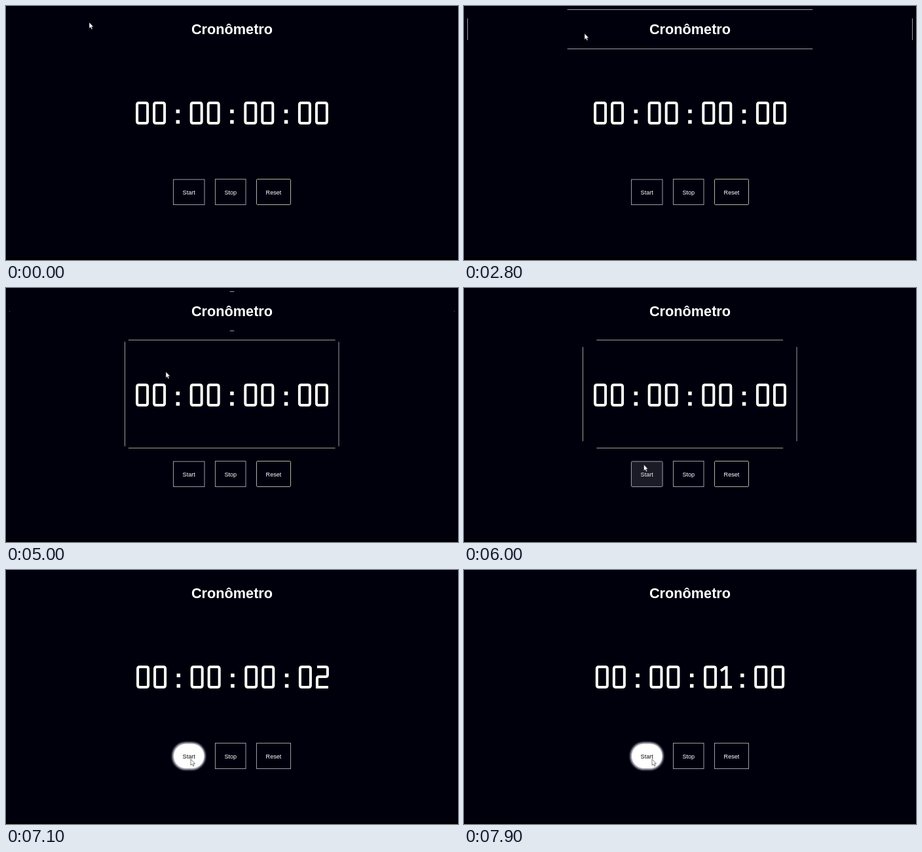
An HTML page that plays this animation: 690x388 px, repeating every 8 s.

```html
<!DOCTYPE html>
<html lang="pt">
<head>
<meta charset="utf-8">
<title>Cronômetro</title>
<style>
  html, body { margin: 0; width: 100%; height: 100%; overflow: hidden; background: #00000d; }
  svg { display: block; width: 690px; height: 388px; }
  text { font-family: "Liberation Sans", Arial, sans-serif; text-anchor: middle; fill: #fff; }
  .line { fill: none; stroke: #9c9ca2; stroke-width: 1; }
  .label { font-size: 9.1px; }
  #digits { fill: none; stroke: #fffffa; stroke-width: 4; }
</style>
</head>
<body>
<svg viewBox="0 0 690 388">
  <defs>
    <filter id="blur" x="-30%" y="-30%" width="160%" height="160%">
      <feGaussianBlur stdDeviation="1.7"/>
    </filter>
  </defs>
  <rect width="690" height="388" fill="#00000d"/>
  <rect y="384" width="690" height="4" fill="#000"/>
  <text x="345" y="43" font-size="21.7" font-weight="bold">Cronômetro</text>
  <path id="header" class="line"/>
  <path id="panel" class="line"/>
  <g id="digits" role="img"></g>
  <rect id="glow" x="254" y="263.5" width="50" height="41.5" fill="#d9d9ee" filter="url(#blur)"/>
  <rect id="start" class="line" x="255.5" y="265" width="47.5" height="38.5"/>
  <text id="startText" class="label" x="279.2" y="287.5">Start</text>
  <rect class="line" x="319.5" y="264.5" width="46.5" height="39"/>
  <text class="label" x="342.8" y="287.5">Stop</text>
  <rect id="reset" class="line" x="382.5" y="264.5" width="52" height="39"/>
  <text class="label" x="408.5" y="287.5">Reset</text>
  <path id="cursor" d="M0 0V9.2L2.1 7.4L3.6 10.7L5.1 10L3.7 6.8H6.5Z" fill="#fff" stroke="#222" stroke-width=".6"/>
</svg>
<script>
const LOOP = 8000, STEP = 100;
const el = id => document.getElementById(id);
const set = (id, attrs) => {
  for (const k in attrs) el(id).setAttribute(k, attrs[k]);
};

// Glyph outlines on a 35 px high cell: [advance, path]
const GLYPHS = {
  0: [26, "M8 2H18Q21 2 21 5V30Q21 33 18 33H8Q5 33 5 30V5Q5 2 8 2Z"],
  1: [20.5, "M3 8L10 2.8H11.5V33M3 33H20"],
  2: [24, "M5 2H18Q21 2 21 5V14Q21 17 18 17H8Q5 17 5 20V33H22"],
  3: [24, "M5 2H18Q21 2 21 5V30Q21 33 18 33H5M8 16.5H21"],
  4: [24, "M7 0L5 22V25H23M18 14V35"],
  5: [24, "M21 2H5V15H18Q21 15 21 18V30Q21 33 18 33H5"],
  6: [24, "M19 2H8Q5 2 5 5V30Q5 33 8 33H18Q21 33 21 30V19Q21 16 18 16H5"],
  7: [23, "M3 2H20V6L10 35"],
  8: [25, "M8 2H18Q21 2 21 5V30Q21 33 18 33H8Q5 33 5 30V5Q5 2 8 2ZM5 16.5H21"],
  9: [24, "M7 33H18Q21 33 21 30V5Q21 2 18 2H8Q5 2 5 5V16Q5 19 8 19H21"],
  ":": [30.6, "M12.5 15H18M12.5 31H18"]
};

// Mouse path: [time, x, y]
const MOUSE = [
  [800, 127, 25], [900, 126, 27], [1150, 112, 66], [1500, 60, 150], [1700, 48, 167],
  [1800, 50, 167], [1900, 62, 163], [2100, 102, 125], [2300, 102, 125], [2400, 108, 106],
  [2480, 130, 66], [2800, 184, 42], [3200, 199, 37], [3900, 199, 37], [4000, 201, 39],
  [4130, 209, 66], [4230, 216, 80], [4500, 236, 115], [4800, 244, 128], [5400, 244, 128],
  [5880, 268, 245], [5960, 273, 266], [6200, 282, 289], [7800, 282, 289], [7900, 287, 289]
];

// CSS "ease": cubic-bezier(.25, .1, .25, 1)
function ease(x) {
  if (x <= 0) return 0;
  if (x >= 1) return 1;
  const curve = (a, b, s) => 3 * a * s * (1 - s) ** 2 + 3 * b * s * s * (1 - s) + s ** 3;
  let lo = 0, hi = 1;
  for (let i = 0; i < 24; i++) {
    const mid = (lo + hi) / 2;
    if (curve(.25, .25, mid) < x) lo = mid; else hi = mid;
  }
  return curve(.1, 1, lo);
}

// Grows while hovered; an interrupted transition reverses in proportion
function hover(t, enter, leave) {
  const peak = ease((leave - enter) / 1000);
  return t < leave ? ease((t - enter) / 1000)
                   : peak * (1 - ease((t - leave) / (1000 * peak)));
}

function mouseAt(t) {
  const i = MOUSE.findIndex(k => k[0] > t);
  if (i === 0) return MOUSE[0].slice(1);
  if (i < 0) return MOUSE[MOUSE.length - 1].slice(1);
  const [t0, x0, y0] = MOUSE[i - 1], [t1, x1, y1] = MOUSE[i];
  const f = (t - t0) / (t1 - t0);
  return [x0 + (x1 - x0) * f, y0 + (y1 - y0) * f];
}

// Four sides, each growing out of its middle
function frame(l, top, r, b, p) {
  if (p < .002) return "";
  const cx = (l + r) / 2, cy = (top + b) / 2;
  const w = (r - l) * p, h = (b - top) * p;
  const across = y => `M${cx - w / 2} ${y}h${w}`;
  const down = x => `M${x} ${cy - h / 2}v${h}`;
  return across(top) + across(b) + down(l) + down(r);
}

let shown = "";
function showTime(tenths) {
  const pad = n => String(n).padStart(2, "0");
  const text = "00:00:" + pad(Math.floor(tenths / 10)) + ":" + pad(tenths % 10);
  if (text === shown) return;
  shown = text;
  const chars = [...text];
  let x = 345 - chars.reduce((sum, c) => sum + GLYPHS[c][0], 0) / 2;
  el("digits").innerHTML = chars.map(c => {
    const [advance, d] = GLYPHS[c];
    const part = `<path transform="translate(${x.toFixed(2)} 146)" d="${d}"${c === ":" ? ' stroke-width="5.5"' : ""}/>`;
    x += advance;
    return part;
  }).join("");
  set("digits", { "aria-label": text });
}

function draw(t) {
  const head = t < 2000 ? hover(t, 850, 1150) : hover(t, 2480, 4130);
  set("header", { d: frame(5.5, 5.5, 684.5, 65.5, head) });
  set("panel", { d: frame(181.5, 79.5, 508, 244.5, hover(t, 4230, 5880)) });

  const on = ease((t - 5940) / 800);
  const radius = Math.min(19.25, 22 * on);
  const ink = Math.round(255 - 240 * on);
  set("glow", { opacity: on, rx: radius + 1 });
  set("start", { rx: radius, style: `fill:rgba(255,255,255,${on})` });
  set("startText", { style: `fill:rgb(${ink},${ink},${ink})` });

  const focused = t < 6800;
  set("reset", { rx: focused ? 1.2 : 0, style: focused ? "stroke:#b4b4a2" : "" });
  showTime(Math.max(0, Math.floor(t / 100) - 69));
  set("cursor", { transform: `translate(${mouseAt(t).join(" ")})` });
}

const begin = performance.now();
function tick() {
  const t = (performance.now() - begin) % LOOP;
  draw(Math.floor(t / STEP) * STEP);
  requestAnimationFrame(tick);
}
tick();
</script>
</body>
</html>
```
